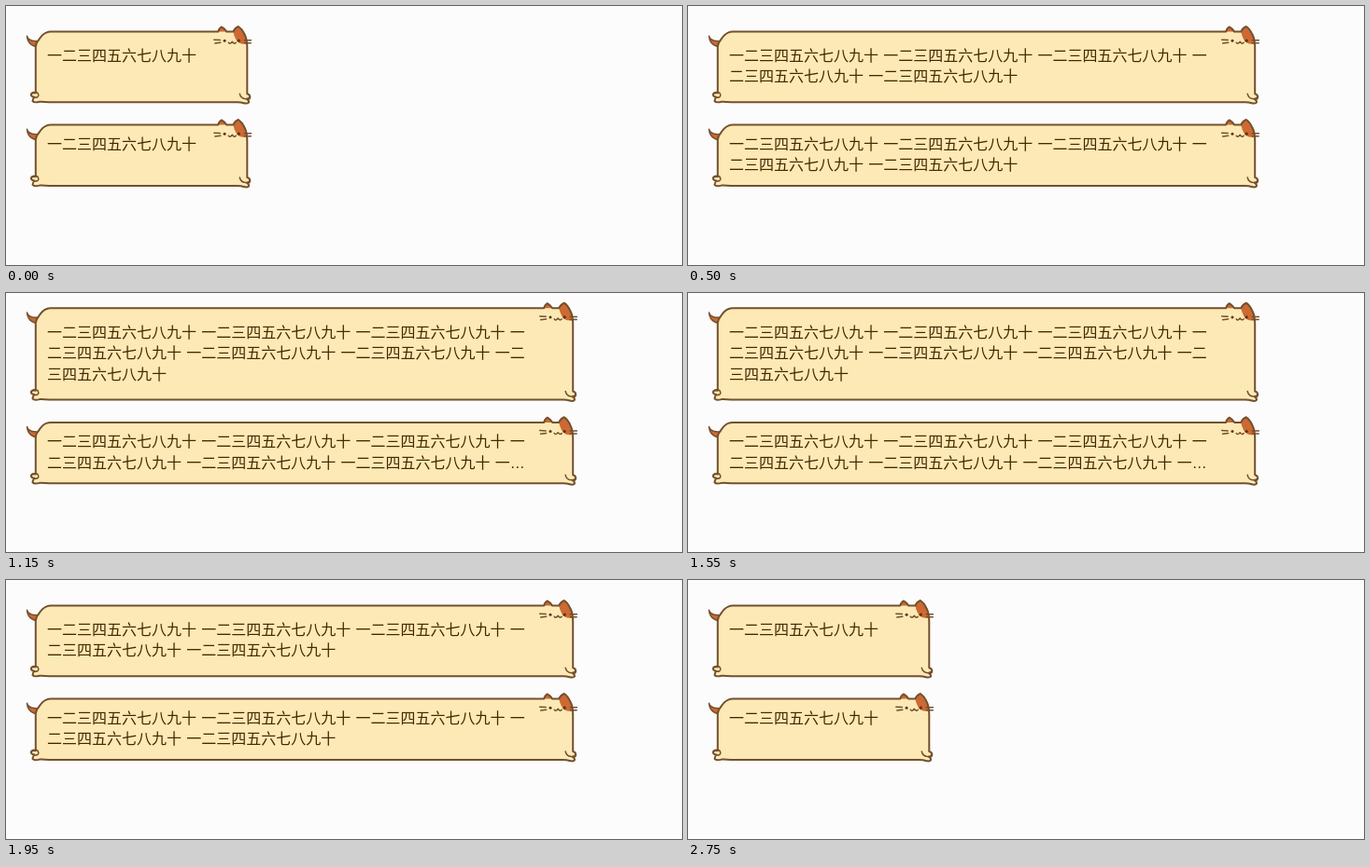
Write an HTML page that moves like this. It is 724 by 278 pixels and loops after 2800 ms.

```html
<!DOCTYPE html>
<html lang="zh">
<head>
<meta charset="utf-8">
<title>Stretching cat bubbles</title>
<style>
  html, body { margin: 0; width: 100%; height: 100%; overflow: hidden; background: #fcfcfc; }
  svg { display: block; }
  text {
    font: 16px "Liberation Sans", "Noto Sans CJK SC", "Noto Sans CJK JP", "Noto Sans CJK", sans-serif;
    word-spacing: .8px;
    fill: #452700;
    white-space: pre;
  }
  .skin { fill: #fde9b5; }
  .fur { fill: #cd6932; }
  .line { fill: none; stroke: #73502e; stroke-width: 2; stroke-linejoin: round; stroke-linecap: round; }
  .thin { stroke-width: 1.5; }
  .dot { fill: #5a3518; }
</style>
</head>
<body>
<svg id="stage" width="724" height="278" viewBox="0 0 724 278"></svg>
<script>
const LOOP = 2800;
const GROUP = '一二三四五六七八九十';
const ROW = 34;
const LEADING = 22.5;

// [start ms, number of groups]
const STEPS = [
  [0, 1], [100, 2], [200, 3], [300, 4], [450, 5], [550, 6], [650, 7],
  [1600, 6], [1800, 5], [2000, 4], [2150, 3], [2300, 2], [2450, 1]
];

const stage = document.getElementById('stage');
const clamp = (lo, v, hi) => Math.max(lo, Math.min(v, hi));
const path = (cls, d) => `<path class="${cls}" d="${d}"/>`;

// Ear contours as relative path pieces, left to right.
const LEFT_EAR = 'q1 -4 3.6 -5.2q3 1.6 5.4 5.2';
const RIGHT_EAR = 'q2 -4.4 5.6 -5.6q4 2.6 6.6 8.6';

function outline(r, h) {
  return `M48 0H${r - 31}${LEFT_EAR}H${r - 15}${RIGHT_EAR}
    q2.8 5 2.8 14V${h - 9}
    q2.5 .5 3 3q.3 2.5 -3 3.2q2.5 1.5 1.5 3.4q-2 1.4 -5 .4q-3 -1 -7 -1
    H46q-7 -.6 -10 -.4q-6 1.4 -7.5 -.6q.2 -2.5 1.8 -4.5
    q-3.8 -.4 -3.3 -3q1 -2.2 4.8 -1.3V16q.4 -4 2.4 -6q4.8 -7.6 8.8 -9q2.5 -1 5 -1z`;
}

function tail() {
  const d = 'M22.5 4.6q1 3.6 5 4.8q4 1 7 .4l-2.6 6q-5 -.8 -7.6 -5q-1.6 -3 -1.8 -6.2z';
  return path('fur', d) + path('line thin', d);
}

function face() {
  return path('line thin', 'M-35.5 8.6l6.5 .4M-34.5 12.4l6 -.8M-3 9.2h7.2M-3 12.2h7') +
    path('line thin', 'M-20 11.6q1 2 3 .2l1 -1l1 1q1.8 1.6 3 -.2') +
    '<circle class="dot" cx="-24.2" cy="9.6" r="1.5"/><circle class="dot" cx="-9" cy="9.6" r="1.6"/>';
}

function bubble(r, top, h, rows, first) {
  const body = outline(r, h);
  const ears = `M${r - 31} 0${LEFT_EAR}z
    M${r - 15} 0${RIGHT_EAR}q2.2 4 2.6 10q-9 1.4 -12 -5q-2 -4 -2.8 -8z`;
  const feet = `M27.3 ${h - 9.5}q3 -2 6.5 -.5q2 3 0 4.5q-2 .8 -4 .3
    M${r - 8} ${h - 9}q1 5 6 5.5q3 0 4.5 -1.6`;
  const words = rows.map((s, i) =>
    `<text x="44" y="${first + i * LEADING}">${s}</text>`).join('');
  return `<g transform="translate(0 ${top})">
    ${tail()}${path('skin', body)}${path('fur', ears)}${path('line', body)}${path('line thin', feet)}
    <g transform="translate(${r} 0)">${face()}</g>${words}</g>`;
}

function draw(n) {
  const all = Array(n).fill(GROUP).join(' ');
  const right = clamp(258.3, 77 + 165.2 * n, 607.2);
  const rows = [0, 1, 2].map(i => all.slice(i * ROW, (i + 1) * ROW)).filter(Boolean);
  const grow = rows.length > 2 ? 11.3 : 0;
  const clipped = grow ? [rows[0], rows[1].slice(0, -1) + '…'] : rows;
  stage.innerHTML =
    bubble(right, 27.6 - grow, 75.6 + 2 * grow, rows, 31.4) +
    bubble(right, 127.6 + grow, 65.4, clipped, 26.4);
}

let shown = 0;
function tick() {
  const t = performance.now() % LOOP;
  const n = STEPS.filter(s => s[0] <= t).pop()[1];
  if (n !== shown) draw(shown = n);
  requestAnimationFrame(tick);
}
tick();
</script>
</body>
</html>
```
